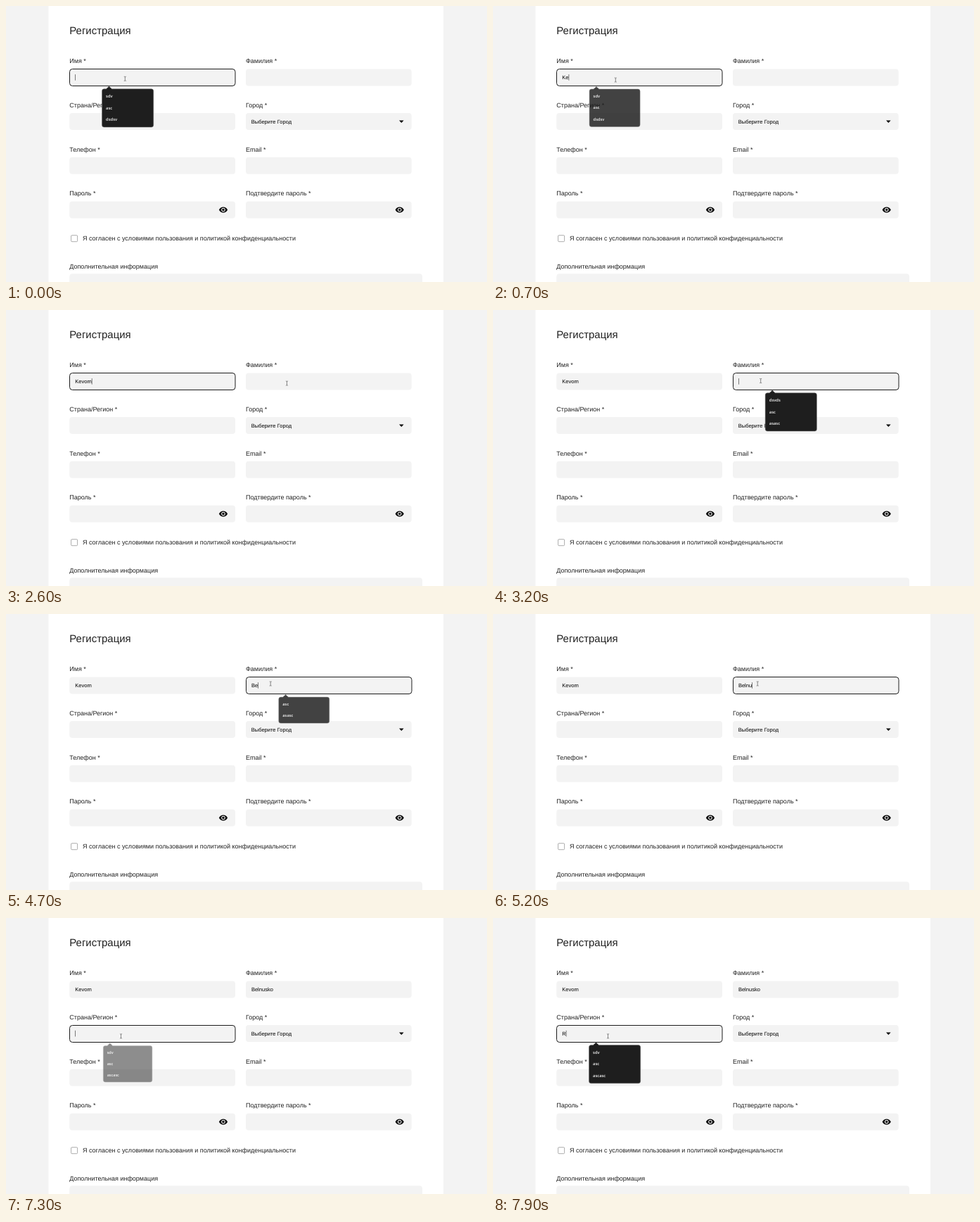
Write an HTML page that moves like this. It is 684x392 px and loops after 8 s.

```html
<!DOCTYPE html>
<html lang="ru">
<head>
<meta charset="utf-8">
<title>Регистрация</title>
<style>
  html, body { margin: 0; width: 100%; height: 100%; overflow: hidden; background: #f3f3f3; }
  svg { display: block; width: 100vw; height: 100vh; }
  text { font-family: "Liberation Sans", Arial, sans-serif; fill: #222; text-rendering: geometricPrecision; }
  .title { font-size: 14.95px; }
  .label { font-size: 9px; }
  .value { font-size: 7.55px; fill: #000; }
  .hint { font: 600 5.8px "Open Sans", "Noto Sans", sans-serif; fill: #f4f4f4; }
  .field { fill: #f3f3f3; }
  .focus { fill: none; stroke: #1c1c1c; }
  .menu { fill: #1e1e1e; stroke: #666; stroke-width: .5; }
  .caret { fill: #444; }
  .beam { fill: none; stroke: #555; stroke-width: .7; }
</style>
</head>
<body>
<svg id="stage" viewBox="0 0 684 392">
  <defs>
    <g id="eye">
      <path d="M-6.1 0C-3.7-5.4 3.7-5.4 6.1 0C3.7 5.4-3.7 5.4-6.1 0Z"/>
      <circle r="2.8" fill="#f3f3f3"/>
      <circle r="1.75"/>
    </g>
  </defs>
  <rect x="60.5" y="-10" width="561.5" height="420" fill="#fff"/>
</svg>
<script>
const LOOP = 8000, STEP = 100, BLINK = 550, FADE_IN = 200, FADE_OUT = 240;
const LEFT = 90.3, RIGHT = 341, TOP = 89.4, ROW = 62.7, WIDTH = 235.7, HEIGHT = 24;
const stage = document.getElementById('stage');

function add(tag, attrs, parent = stage, content = '') {
  const node = document.createElementNS('http://www.w3.org/2000/svg', tag);
  for (const key in attrs) node.setAttribute(key, attrs[key]);
  node.textContent = content;
  parent.appendChild(node);
  return node;
}
const write = (kind, x, y, content, parent) => add('text', { class: kind, x, y }, parent, content);
const show = (node, opacity) => node.setAttribute('opacity', +opacity);
const clamp = v => Math.min(1, Math.max(0, v));

// Static form
write('title', LEFT, 40, 'Регистрация');
const labels = [
  ['Имя *', 'Фамилия *'],
  ['Страна/Регион *', 'Город *'],
  ['Телефон *', 'Email *'],
  ['Пароль *', 'Подтвердите пароль *']
];
labels.forEach((pair, row) => pair.forEach((label, col) => {
  const x = col ? RIGHT : LEFT, y = TOP + row * ROW;
  write('label', x, y - 8.1, label);
  add('rect', { class: 'field', x, y, width: WIDTH, height: HEIGHT, rx: 4 });
}));
write('value', RIGHT + 7.7, TOP + ROW + 14.4, 'Выберите Город');
add('path', { d: 'M559 162.4h6.6l-3.3 3.5z' });
for (const x of [LEFT, RIGHT]) add('use', { href: '#eye', x: x + 218.7, y: 289.5 });
add('rect', { x: 92.6, y: 325.7, width: 9, height: 9, rx: 1.2, fill: '#fff', stroke: '#888', 'stroke-width': .7 });
write('label', 109, 333.1, 'Я согласен с условиями пользования и политикой конфиденциальности');
write('label', LEFT, 372.6, 'Дополнительная информация');
add('rect', { class: 'field', x: LEFT, y: 380.3, width: 501.7, height: 40, rx: 4 });

// Each field: focused from/to, first key at `typing`, one key per `pace`, menu closing at `shut`
const entries = [
  { x: LEFT, y: TOP, from: -400, to: 3000, word: 'Kevom', typing: 400, pace: 255, shut: 660,
    hints: ['sdv', 'asc', 'dsdsv'] },
  { x: RIGHT, y: TOP, from: 2900, to: 7300, word: 'Belnusko', typing: 4300, pace: 205, shut: 4660,
    hints: ['dsvds', 'asc', 'asasc'], filtered: ['asc', 'asasc'] },
  { x: LEFT, y: TOP + ROW, from: 7200, to: LOOP, word: 'R', typing: 7900, pace: 200, shut: LOOP,
    hints: ['sdv', 'asc', 'ascasc'] }
];

function buildMenu(hints) {
  const group = add('g', {});
  const height = 4.2 + 16.7 * hints.length;
  add('path', { class: 'menu', d: `M3 0h3l4-3.7l4 3.7h56.2q3 0 3 3v${height - 6}q0 3-3 3h-67.2q-3 0-3-3v-${height - 6}q0-3 3-3z` }, group);
  hints.forEach((hint, i) => write('hint', 5.6, 12 + i * 16.8, hint, group));
  return group;
}

for (const e of entries) {
  e.text = write('value', e.x + 7.9, e.y + 14.4, '');
  e.caret = add('rect', { class: 'caret', y: e.y + 7.7, width: .7, height: 8.6 });
  e.ring = add('rect', { class: 'focus', x: Math.floor(e.x) + .5, y: Math.floor(e.y) + .5, width: 235.5, height: HEIGHT, rx: 4 });
}
for (const e of entries) {
  e.menu = buildMenu(e.hints);
  e.shortMenu = e.filtered && buildMenu(e.filtered);
}

// The menu shrinks a little around its middle as it fades
function placeMenu(menu, e, opacity) {
  const scale = .9 + .1 * opacity;
  show(menu, opacity);
  menu.setAttribute('transform', `translate(${e.x + 82.8} ${e.y + 46}) scale(${scale}) translate(-36.6 -17.6)`);
}

// Pointer moves: curved by one control point, slowing towards the end
const pointer = add('path', { class: 'beam', d: 'M-1.5-3h1.1l.4.4l.4-.4h1.1M0-2.6v5.2M-1.5 3h1.1l.4-.4l.4.4h1.1' });
const rest = { x: 169.3, y: 103.3 };
const moves = [
  { start: 0, span: 200, bend: { x: 172, y: 104 }, end: { x: 174.3, y: 105 } },
  { start: 1900, span: 870, bend: { x: 640, y: 148 }, end: { x: 380.7, y: 100.6 } },
  { start: 3400, span: 200, bend: { x: 378, y: 100 }, end: { x: 376.2, y: 99 } },
  { start: 6400, span: 700, bend: { x: 130, y: 200 }, end: { x: 163.5, y: 167.8 } }
];

function pointerAt(t) {
  let at = rest;
  for (const { start, span, bend, end } of moves) {
    if (t < start) break;
    const k = 1 - (1 - clamp((t - start) / span)) ** 2;
    const curve = axis => (1 - k) ** 2 * at[axis] + 2 * k * (1 - k) * bend[axis] + k * k * end[axis];
    at = { x: curve('x'), y: curve('y') };
  }
  return at;
}

function draw(t) {
  for (const e of entries) {
    const active = t > e.from && t < e.to;
    const typed = Math.min(e.word.length, Math.max(0, Math.floor((t - e.typing) / e.pace) + 1));
    e.text.textContent = e.word.slice(0, typed);
    e.caret.setAttribute('x', e.x + 8 + e.text.getComputedTextLength());

    const lastInput = typed ? e.typing + (typed - 1) * e.pace : e.from;
    show(e.caret, active && (t - lastInput) % (2 * BLINK) < BLINK);
    show(e.ring, active);

    const opacity = active ? Math.min(clamp((t - e.from) / FADE_IN), 1 - clamp((t - e.shut) / FADE_OUT)) : 0;
    const short = e.shortMenu && typed > 1;
    placeMenu(e.menu, e, short ? 0 : opacity);
    if (e.shortMenu) placeMenu(e.shortMenu, e, short ? opacity : 0);
  }
  const { x, y } = pointerAt(t);
  pointer.setAttribute('transform', `translate(${x} ${y})`);
}

function tick(now) {
  draw(Math.floor(now / STEP) * STEP % LOOP);
  requestAnimationFrame(tick);
}
draw(0);
requestAnimationFrame(tick);
</script>
</body>
</html>
```
